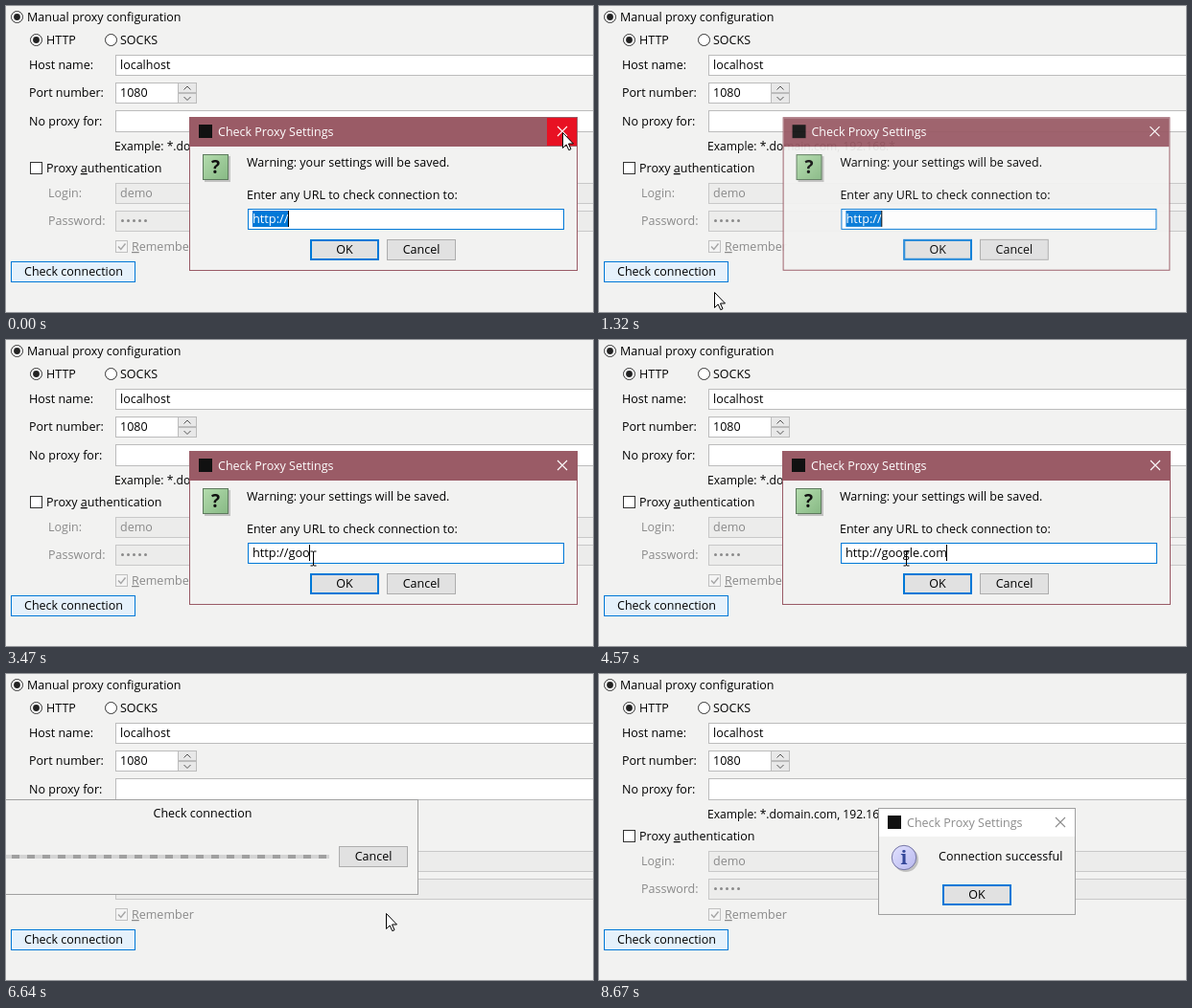
These frames come from a looping animation (612x320 px, 8750 ms). An HTML page:

```html
<!DOCTYPE html>
<html lang="en">
<head>
<meta charset="utf-8">
<title>Proxy settings check</title>
<style>
  html, body { margin: 0; width: 100%; height: 100%; overflow: hidden; background: #f2f2f1; }
  svg { display: block; width: 612px; height: 320px; }
  text { font: 12.5px "Open Sans", "Noto Sans", sans-serif; white-space: pre; }
  tspan { text-decoration: underline; }
  .mid { text-anchor: middle; }
  .url { font-size: 12.75px; }
  .hint { font-size: 12.1px; }
</style>
</head>
<body>
<svg id="stage" viewBox="0 0 612 320"></svg>
<script>
const LOOP = 8750;
const BLUE = '#0078d7', GREY = '#8a8a8a', TITLE = '#9a5b66', PANEL = '#f2f2f1', FOCUS = '#e5f1fb';

// Markup helpers; boxes get a crisp one-pixel border.
const label = (x, y, s, fill = '#000', attrs = '') =>
  `<text x="${x}" y="${y}" fill="${fill}" ${attrs}>${s}</text>`;
const box = (x, y, w, h, fill = '#fff', stroke = '#bcbcbc', attrs = '') =>
  `<rect x="${x + .5}" y="${y + .5}" width="${w - 1}" height="${h - 1}" fill="${fill}" stroke="${stroke}" ${attrs}/>`;
const line = (d, stroke, attrs = '') =>
  `<path d="${d}" fill="none" stroke="${stroke}" ${attrs}/>`;
const radio = (x, y, on) =>
  `<circle cx="${x}" cy="${y}" r="6" fill="#fff" stroke="#333"/>` +
  (on ? `<circle cx="${x}" cy="${y}" r="3.4" fill="#222"/>` : '');
const button = (x, y, w, s) =>
  box(x, y, w, 22, '#e1e1e1', '#adadad') + label(x + w / 2, y + 15, s, '#000', 'class="mid"');
// A default button has a double border, which turns single while focused.
const okButton = (x, y, w, id) =>
  box(x, y, w, 22, '#e1e1e1', BLUE, `id="${id}"`) +
  box(x + 1, y + 1, w - 2, 20, 'none', BLUE, `id="${id}Inner"`) +
  label(x + w / 2, y + 15, 'OK', '#000', 'class="mid"');
const cross = (x, y, id) =>
  line(`M${x - 5} ${y - 5}l10 10m0-10l-10 10`, '#fff', `id="${id}" stroke-width="1.1"`);
const bar = (x, y, w, h, id) =>
  `<rect id="${id}" x="${x}" y="${y}" width="${w}" height="${h}" fill="${TITLE}"/>`;

const form = [
  radio(11.5, 11.5, true), label(22, 16, 'Manual proxy configuration'),
  radio(31.5, 35.5, true), label(42, 40, 'HTTP'),
  radio(109.5, 35.5, false), label(119, 40, 'SOCKS'),
  label(24, 66, 'Host name:'), box(114, 51, 510, 22), label(119, 66, 'localhost'),
  label(24, 95, 'Port number:'), box(114, 80, 85, 22), label(119, 95, '1080'),
  box(179, 80, 20, 11, '#e8e8e8'), box(179, 91, 20, 11, '#e8e8e8'),
  line('M185.5 87.5l3.5-3.5 3.5 3.5M185.5 95l3.5 3.5 3.5-3.5', '#555'),
  label(24, 125, 'No proxy for:'), box(114, 109, 510, 23),
  label(113, 151, 'Example: *.domain.com, 192.168.*', '#000', 'class="hint"'),
  box(25, 163, 13, 13, '#fff', '#333'),
  label(42, 174, 'Proxy <tspan>a</tspan>uthentication'),
  label(44, 200, 'Login:', GREY), box(114, 185, 510, 22, '#ececeb', '#c8c8c8'), label(119, 200, 'demo', GREY),
  label(44, 229, 'Password:', GREY), box(114, 214, 510, 22, '#ececeb', '#c8c8c8'),
  line('M121.5 224.5h25', GREY, 'stroke-width="3" stroke-linecap="round" stroke-dasharray="0 6"'),
  box(114, 245, 13, 13, '#f4f4f4', '#c0c0c0'),
  line('M117 251.5l2.8 3 4.7-6', '#a5a5a5', 'stroke-width="1.4"'),
  label(131, 256, '<tspan>R</tspan>emember', GREY),
  box(5, 267, 130, 22, FOCUS, BLUE, 'id="check"'), label(19, 282, 'Check connection')
].join('');

const askDialog = [
  box(191, 116, 405, 161, PANEL, TITLE), bar(192, 117, 403, 30, 'askBar'),
  '<rect id="askHot" x="564" y="117" width="31" height="29" fill="#e81123"/>',
  cross(580, 131, 'askX'),
  '<rect x="201" y="124" width="14" height="14" fill="#111"/>',
  label(221, 136, 'Check Proxy Settings', '#fff'),
  '<rect x="207" y="157" width="27" height="27" fill="#000" opacity=".2"/>',
  box(205, 155, 27, 27, 'url(#green)', '#5d7a5d'),
  label(218.5, 175, '?', '#111', 'class="mid" style="font-size:19px;font-weight:bold"'),
  label(251, 168, 'Warning: your settings will be saved.'),
  label(251, 202, 'Enter any URL to check connection to:'),
  box(252, 212, 330, 22, '#fff', BLUE),
  `<rect id="mark" x="257" y="214" height="17" fill="${BLUE}"/>`,
  label(257, 227, '', '#000', 'id="url" class="url"'),
  '<rect id="caret" y="214" width="1" height="17" fill="#000"/>',
  okButton(317, 244, 72, 'askOk'), button(397, 244, 72, 'Cancel')
].join('');

const progress = [
  box(-20, 131, 450, 100, PANEL, '#a0a0a0'),
  label(205, 150, 'Check connection', '#000', 'class="mid"'),
  '<rect x="-10" y="189" width="347" height="4" fill="#d4d4d4"/>',
  line('M-10 191h347', '#a0a0a0', 'id="stripes" stroke-width="4" stroke-dasharray="8 8"'),
  button(347, 180, 72, 'Cancel')
].join('');

const doneDialog = [
  box(291, 140, 206, 112, PANEL, TITLE, 'id="doneFrame"'), bar(292, 141, 204, 29, 'doneBar'),
  cross(481, 155, 'doneX'),
  '<rect x="301" y="148" width="14" height="14" fill="#111"/>',
  label(321, 160, 'Check Proxy Settings', '#fff', 'id="doneTitle"'),
  '<circle cx="320" cy="194" r="13" fill="#000" opacity=".2"/>',
  '<circle cx="318" cy="192" r="12.7" fill="url(#lilac)" stroke="#7676a4"/>',
  label(318, 199, 'i', '#35489a', 'class="mid" style="font:bold 20px \'Noto Serif\',serif"'),
  label(354, 195, 'Connection successful'),
  okButton(358, 220, 72, 'doneOk')
].join('');

const gradient = (id, from, to) =>
  `<linearGradient id="${id}" x2="1" y2="1"><stop stop-color="${from}"/><stop offset="1" stop-color="${to}"/></linearGradient>`;

document.getElementById('stage').innerHTML = `
  <defs>${gradient('green', '#b4dcae', '#87b984')}${gradient('lilac', '#e2e2ff', '#b8b8ee')}</defs>
  ${form}
  <g id="ask">${askDialog}</g><g id="busy">${progress}</g><g id="done">${doneDialog}</g>
  <path id="arrow" d="M.5.5V16.5L4.2 13 6.8 18.7 9 17.7 6.5 12H11.5Z" fill="#fff" stroke="#000"/>
  <path id="beam" d="M-3-7.5H-1Q0-7.5 0-6.5V6.5Q0 7.5-1 7.5H-3M3-7.5H1Q0-7.5 0-6.5M0 6.5Q0 7.5 1 7.5H3" fill="none" stroke="#000"/>`;

const el = id => document.getElementById(id);
const set = (id, name, value) => el(id).setAttribute(name, value);
const show = (id, on) => set(id, 'visibility', on ? 'visible' : 'hidden');
const clamp = v => Math.max(0, Math.min(1, v));
const between = (t, a, b) => t >= a && t < b;

// Pointer stops: time, x, y
const path = [
  [0, 580, 132], [180, 579, 133], [400, 420, 200], [630, 172, 270], [850, 84, 288],
  [930, 79, 289], [1090, 79, 289], [1300, 110, 299], [1500, 205, 301], [1700, 298, 260],
  [1850, 314, 230], [1920, 312, 224], [2070, 312, 224], [2150, 320, 228], [5110, 320, 228],
  [5180, 316, 232], [5330, 337, 255], [6420, 337, 255], [6730, 420, 248], [7400, 420, 248], [7820, 502, 321]
];
function pointer(t) {
  const i = path.findIndex(p => p[0] > t);
  if (i < 0) return path[path.length - 1].slice(1);
  const [a, x, y] = path[i - 1], [b, u, v] = path[i], p = (t - a) / (b - a);
  return [x + (u - x) * p, y + (v - y) * p];
}

const typed = 'google.com';
const keyTimes = [2930, 3240, 3470, 3550, 3780, 3930, 4100, 4340, 4400, 4570];

// Windows fade while scaling slightly about their centre.
function pose(id, amount, scale, x, y) {
  show(id, amount > 0);
  set(id, 'opacity', amount);
  set(id, 'transform', `translate(${x} ${y}) scale(${scale}) translate(${-x} ${-y})`);
}
function popup(id, t, open, close, x, y) {
  const grow = clamp((t - open) / 200), shown = 1 - (1 - grow) ** 2;
  const shrink = clamp((t - close) / 190);
  pose(id, shown * (1 - shrink), .95 + .05 * shown - .05 * shrink, x, y);
}
function paintOk(id, fill, focused) {
  set(id, 'fill', fill);
  set(id + 'Inner', 'stroke-opacity', focused ? 0 : 1);
}

function draw(t) {
  if (t < 600) popup('ask', t, -999, 100, 393.5, 196.5);
  else popup('ask', t, 1170, 5630, 393.5, 196.5);
  popup('done', t, 7200, LOOP + 1, 394, 196);

  set('check', 'fill', between(t, 1010, 1090) ? '#cce4f7' : FOCUS);
  show('askHot', t < 250);
  const pressed = t >= 5580;
  paintOk('askOk', pressed ? '#cce4f7' : t >= 5300 ? FOCUS : '#e1e1e1', pressed);

  const selected = t < 1920;
  el('url').textContent = 'http://' + typed.slice(0, keyTimes.filter(k => k <= t).length);
  const width = el('url').getComputedTextLength();
  set('url', 'fill', selected ? '#fff' : '#000');
  set('mark', 'width', selected ? width : 0);
  set('caret', 'x', Math.round(256.3 + width));
  set('caret', 'width', between(t, 2550, 2930) || t >= 5030 ? 0 : 1);

  show('busy', between(t, 6150, 7050));
  set('stripes', 'stroke-dashoffset', -Math.floor(t / 75) * 2);

  const idle = t >= 8670;
  set('doneBar', 'fill', idle ? '#fff' : TITLE);
  set('doneTitle', 'fill', idle ? '#8c8c8c' : '#fff');
  set('doneX', 'stroke', idle ? '#8c8c8c' : '#fff');
  set('doneFrame', 'stroke', idle ? '#a0a0a0' : TITLE);
  paintOk('doneOk', idle ? '#e1e1e1' : FOCUS, !idle);

  const [x, y] = pointer(t);
  const overField = between(t, 1400, 5500) && y >= 212 && y < 234;
  show('beam', overField);
  show('arrow', !overField && t < 7820);
  set('beam', 'transform', `translate(${Math.round(x) + .5} ${Math.round(y) + .5})`);
  set('arrow', 'transform', `translate(${Math.round(x)} ${Math.round(y)})`);
}

const start = performance.now();
function tick() {
  draw((performance.now() - start) % LOOP);
  requestAnimationFrame(tick);
}
tick();
</script>
</body>
</html>
```
